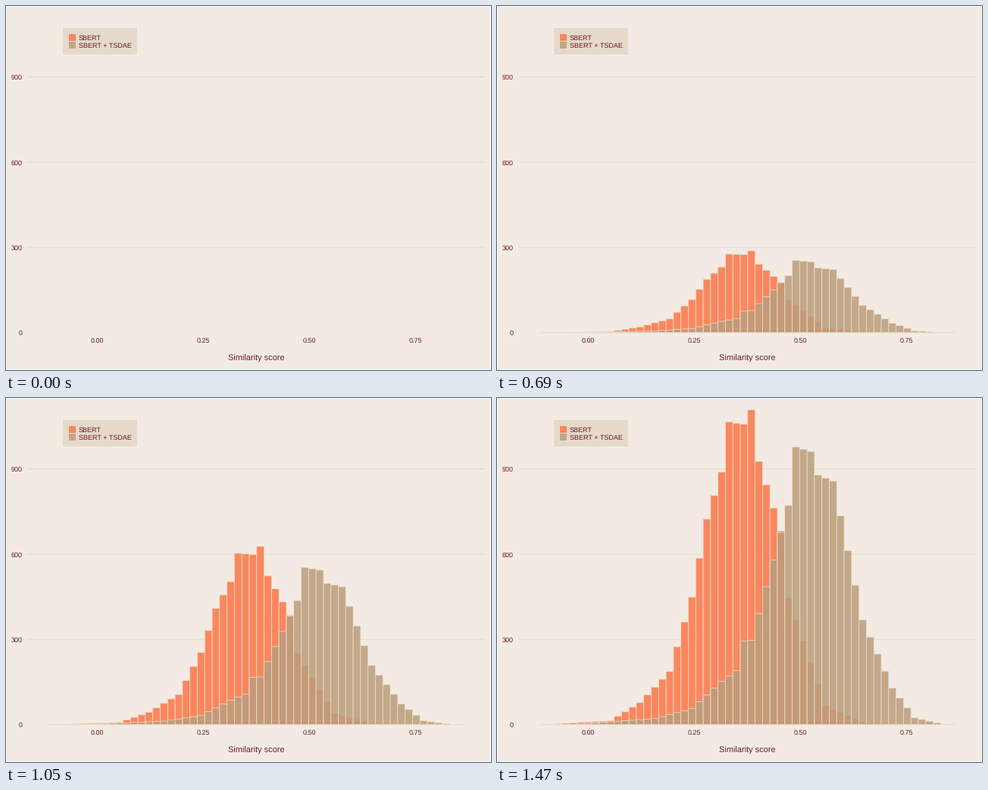
These frames come from a looping animation (640 by 480 pixels, 3 s). A matplotlib script:

```python
import numpy as np
import matplotlib.pyplot as plt
from matplotlib.animation import FuncAnimation
from matplotlib.patches import Rectangle

WIDTH, HEIGHT, DPI = 640, 480, 80
PX = 72 / DPI  # one pixel in points
FRAMES, INTERVAL, LAST_STEP = 100, 30, 49

BACKGROUND = "#f3ebe3"
GRID = "#e6dcd2"
LEGEND = "#e5d9ca"
INK = "#6b1a26"
EDGE = "#ebdccb"

BASE_Y, UNIT_Y = 430.7, 112.4 / 300
ZERO_X, UNIT_X = 120, 560
BINS, BIN_X, BIN_W = 56, 56.7, 9.79

# Outline of each histogram as (bin, height in pixels) at full growth
SBERT = [(0, 0), (9, 5), (13, 29), (17, 70), (20, 168), (22, 271), (24, 333),
         (25, 399), (27, 396), (28, 415), (29, 347), (32, 255), (33, 167),
         (38, 25), (43, 3), (47, 0)]
TSDAE = [(4, 0), (15, 8), (20, 21), (24, 57), (26, 71), (27, 110), (28, 111),
         (31, 217), (33, 289), (34, 366), (36, 360), (37, 329), (39, 321),
         (43, 138), (47, 48), (50, 9), (54, 0)]

SERIES = [
    ("SBERT", SBERT, (0.984, 0.502, 0.329, 0.93)),
    ("SBERT + TSDAE", TSDAE, (0.733, 0.620, 0.486, 0.86)),
]

plt.rcParams["font.family"] = "Liberation Sans"
plt.rcParams["text.hinting"] = "none"

fig = plt.figure(figsize=(WIDTH / DPI, HEIGHT / DPI), dpi=DPI,
                 facecolor=BACKGROUND)
ax = fig.add_axes([0, 0, 1, 1])
ax.set_xlim(0, WIDTH)
ax.set_ylim(HEIGHT, 0)
ax.axis("off")


def label(x, y, text, size=9, ha="center"):
    ax.text(x, y, text, fontsize=size * PX, color=INK, ha=ha, va="baseline")


def box(x, y, w, h, color, **style):
    return ax.add_patch(Rectangle((x, y), w, h, facecolor=color, **style))


def draw_scales():
    for value in range(0, 901, 300):
        y = BASE_Y - value * UNIT_Y
        if value:
            ax.plot([29, 632], [y, y], color=GRID, lw=1.07 * PX, snap=False,
                    solid_capstyle="butt", zorder=0)
        label(22, y + 3.7, str(value), ha="right")
    for value in np.arange(4) / 4:
        label(ZERO_X + value * UNIT_X, 444, f"{value:.2f}")
    label(330.5, 468, "Similarity score", size=11)


def draw_legend():
    box(75, 29, 98, 35, LEGEND, lw=0, zorder=3)
    for row, (name, _, color) in enumerate(SERIES):
        box(83, 37 + 10 * row, 9, 9, color, lw=0, zorder=4)
        label(96, 45 + 10 * row, name, ha="left")


def make_bars():
    bars = []
    for order, (_, outline, color) in enumerate(SERIES):
        heights = np.interp(np.arange(BINS), *zip(*outline))
        for i, height in enumerate(heights):
            bar = box(BIN_X + i * BIN_W, BASE_Y, BIN_W, 0, color,
                      edgecolor=EDGE, lw=0.8 * PX, snap=False,
                      zorder=1 + order)
            bars.append((bar, height))
    return bars


draw_scales()
draw_legend()
box(0, 0, WIDTH, HEIGHT, "none", edgecolor="white", lw=2 * PX, snap=False,
    zorder=5)
bars = make_bars()


def update(frame):
    step = min(frame, LAST_STEP)
    growth = 1 - np.cos(np.pi / 2 * step / LAST_STEP)  # sine ease-in
    for bar, height in bars:
        bar.set_height(-height * growth)
        bar.set_visible(step > 0)
    return [bar for bar, _ in bars]


animation = FuncAnimation(fig, update, frames=FRAMES, interval=INTERVAL,
                          repeat=True, repeat_delay=0,
                          init_func=lambda: update(0))
plt.show()
```
